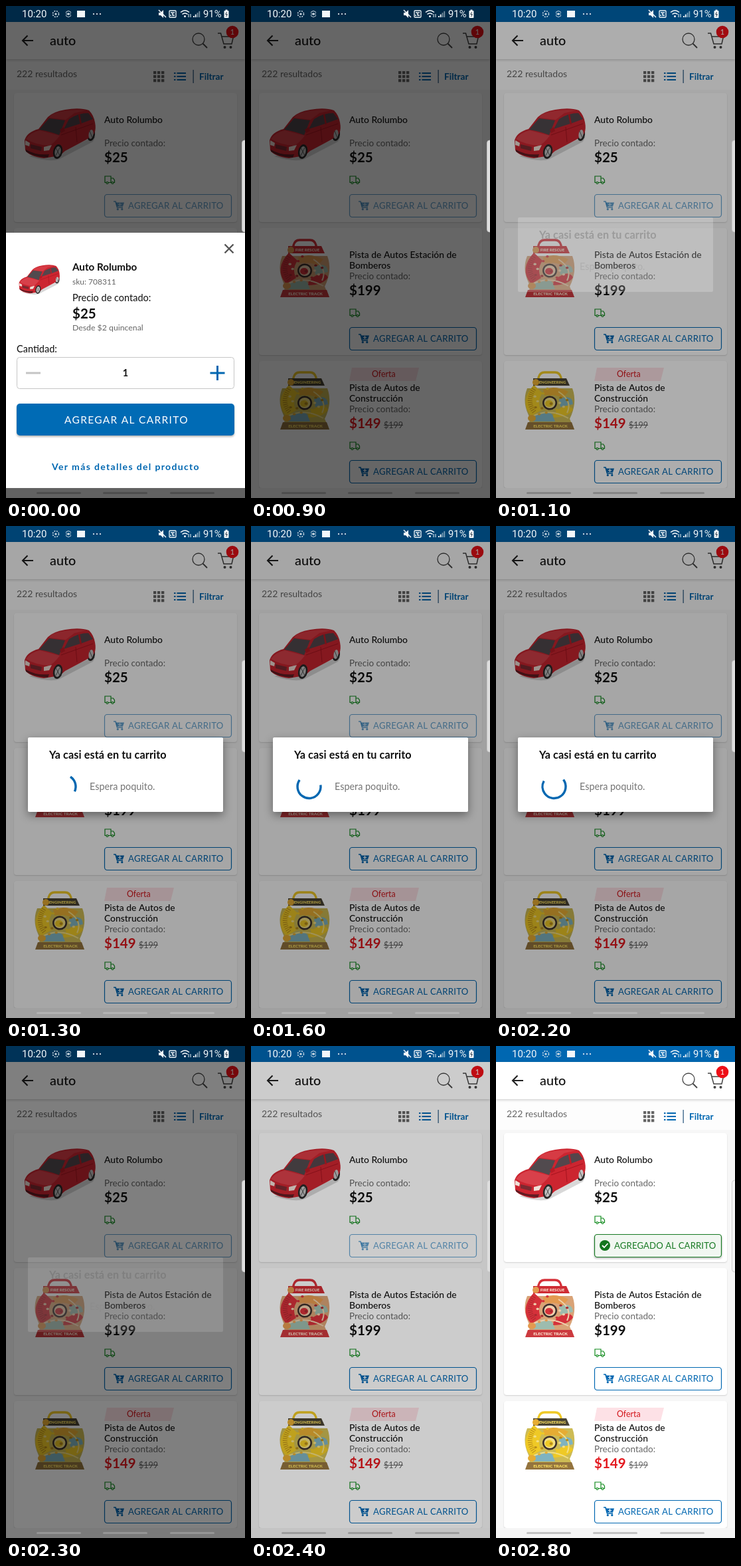
Write an HTML page with a canvas that moves like this. It is 360 px wide and 740 px high and loops after 2900 ms.

```html
<!DOCTYPE html>
<html lang="es">
<head>
<meta charset="utf-8">
<title>Agregar al carrito</title>
<style>
html, body { margin: 0; width: 100%; height: 100%; overflow: hidden; background: #f7f7f7; }
canvas { display: block; width: 360px; height: 740px; }
</style>
</head>
<body>
<canvas id="stage"></canvas>
<script>
const LOOP = 2900, STEP = 100;
const BLUE = '#0067b1', GREEN = '#0f8a1c', INK = '#101010', GRAY = '#666', RED = '#e3191f';
const canvas = document.getElementById('stage');
const ratio = window.devicePixelRatio || 1;
canvas.width = 360 * ratio;
canvas.height = 740 * ratio;
const c = canvas.getContext('2d');
c.scale(ratio, ratio);

function text(s, x, y, size, color, o = {}) {
  c.font = `${o.weight || 400} ${size}px ${o.font || 'Lato'}, sans-serif`;
  c.letterSpacing = (o.gap || 0) + 'px';
  c.textAlign = o.align || 'left';
  c.fillStyle = color;
  c.fillText(s, x, y);
}

function rect(x, y, w, h, fill, r = 0) {
  c.beginPath();
  c.roundRect(x, y, w, h, r);
  c.fillStyle = fill;
  c.fill();
}

function frame(x, y, w, h, color, r, width = 1) {
  c.beginPath();
  c.roundRect(x, y, w, h, r);
  c.strokeStyle = color;
  c.lineWidth = width;
  c.stroke();
}

function poly(points, fill) {
  c.beginPath();
  points.forEach(([x, y]) => c.lineTo(x, y));
  c.closePath();
  c.fillStyle = fill;
  c.fill();
}

function oval(x, y, rx, ry, fill, turn = 0) {
  c.beginPath();
  c.ellipse(x, y, rx, ry, turn, 0, 7);
  c.fillStyle = fill;
  c.fill();
}

function stroke(d, color, width = 1.5) {
  c.strokeStyle = color;
  c.lineWidth = width;
  c.stroke(new Path2D(d));
}

function fill(d, color) {
  c.fillStyle = color;
  c.fill(new Path2D(d));
}

function at(x, y, scale, draw) {
  c.save();
  c.translate(x, y);
  c.scale(scale, scale);
  draw();
  c.restore();
}

function faded(alpha, draw) {
  c.save();
  c.globalAlpha = alpha;
  draw();
  c.restore();
}

function shadowed(blur, dy, alpha, draw) {
  c.save();
  c.shadowColor = `rgba(0,0,0,${alpha})`;
  c.shadowBlur = blur * ratio;
  c.shadowOffsetY = dy * ratio;
  draw();
  c.restore();
}

// Toy car in a 108 x 80 box
function car() {
  fill('M8 74 Q40 84 54 78 L104 52 L108 44 L70 60Z', 'rgba(60,60,60,.2)');
  oval(101, 41, 6, 10, '#2b2929', .15);
  fill('M1 50 Q4 38 22 33 L36 15 Q44 7 62 4 Q84 0 98 5 Q105 12 107 23 Q109 33 106 40 L101 44 L94 49 L62 66 L54 73 L30 77 Q8 74 2 65Z', '#cc2530');
  fill('M3 48 Q10 38 24 35 L54 43 Q45 55 38 58 Q18 57 3 48Z', '#d8404a');
  fill('M42 11 Q66 2 94 5 L76 9 L63 19 L38 16Z', '#d63b44');
  fill('M23 34 L38 17 L62 20 L53 42 Q37 36 23 34Z', '#514a4e');
  fill('M60 33 L68 18 Q82 9 97 9 L104 18 L88 24Z', '#55454b');
  stroke('M83 11 L86 26', '#bd1c26', 2.5);
  stroke('M56 42 L104 25 M78 30 L80 53', '#a5141f', 1);
  fill('M54 34 L60 30 L62 36 L56 39Z', '#b81a25');
  oval(51, 67, 7, 11, '#2b2929', .2);
  oval(51, 67, 4.5, 8, '#c4c4c4', .2);
  oval(101, 41, 3.5, 7, '#c4c4c4', .15);
  stroke('M48 61 L54 73 M54 61 L48 73 M99 36 L103 46', '#555', 1);
  fill('M2 50 L9 54 L8 59 L2 57Z M30 60 L42 57 L38 65 L30 66Z', '#f0dfd7');
  fill('M10 56 L27 60 L26 66 L10 62Z', '#7c2a31');
  fill('M3 64 Q18 73 38 71 L36 76 Q15 75 3 67Z', '#611b22');
}

// Boxed track toy, drawn around its hub
function toy(p) {
  stroke('M-17 -35 V-38 Q-15 -46 -8 -46 H8 Q15 -46 17 -38 V-35', p.main, 3.4);
  fill('M-34 -22 Q-43 0 -29 24 L-36 40 H37 L30 24 Q42 0 34 -22Z', p.ground);
  fill('M-24 -27 Q-47 -2 -28 20 L-13 11 Q-20 -2 -11 -15Z', p.main);
  c.setLineDash([1, 2]);
  stroke('M-24 -21 Q-36 -2 -23 14', p.dark, 7);
  c.setLineDash([]);
  fill('M-10 -20 Q8 -27 28 -17 L20 -8 Q4 -14 -8 -11Z', p.warm);
  fill('M14 -6 Q34 -14 35 2 L16 6Z', p.sky);
  fill('M10 12 Q28 -2 35 10 Q28 22 4 22Z', p.main);
  fill('M-22 18 Q-4 8 4 18 L8 28 H-30Z', p.sky);
  stroke('M-26 20 Q0 7 28 23 M13 -17 Q35 -3 26 15', p.pale, 2);
  for (let i = 0; i < 16; i++) {
    const a = i * 2.4, r = 15 + i * .9;
    oval(r * Math.cos(a), r * Math.sin(a) * .75, 2.2, 1.7, [p.pale, p.dark, p.warm, p.main][i % 4]);
  }
  oval(0, 0, 11, 10.5, '#3b2f2c');
  oval(0, 0, 8.5, 8, p.pale);
  oval(-1, 1, 6, 5, p.main);
  oval(2, 1, 2.5, 2, p.dark);
  poly([[-25, -37], [25, -37], [30, -26], [-25, -26]], p.band);
  oval(-21, -31, 5, 5, p.warm);
  text(p.title, 4, -29.5, 6, p.label, { weight: 900, align: 'center' });
  oval(-27, 23, 6, 5, p.warm);
  poly([[-33, 29], [33, 29], [37, 40], [-37, 40]], p.base);
  text('ELECTRIC TRACK', 1, 37, 6.4, p.label, { weight: 900, align: 'center' });
}

const FIRE = { title: 'FIRE RESCUE', main: '#d5313a', dark: '#a92a30', warm: '#e39a50', sky: '#9dbcae',
  ground: '#d9a377', pale: '#efd0ae', band: '#cf2d35', base: '#cc3a3f', label: '#fbe0cc' };
const BUILD = { title: 'ENGINEERING', main: '#efc926', dark: '#b98d1c', warm: '#e6ac33', sky: '#7fb3c0',
  ground: '#cdbb55', pale: '#f3df85', band: '#4a4434', base: '#94743f', label: '#f8dd5e' };

function truck(y) {
  at(148, y, 1, () => {
    stroke('M3 10.5 H1 V1 H10 V10.5 H6 M10 4 H13.5 L15.5 7 V10.5 H14 M10 10.5 H11', GREEN, 1.2);
    for (const x of [4.5, 12.5]) {
      c.beginPath();
      c.arc(x, 11, 1.5, 0, 7);
      c.stroke();
    }
  });
}

function cartIcon(x, y) {
  at(x, y, 1, () => {
    stroke('M0 1 H3 L5.5 10 H14', BLUE, 1.7);
    fill('M3.5 2.5 H16 L14 8.5 H5Z', BLUE);
    stroke('M9.5 3 V8 M7 5.5 H12', '#fff', 1.2);
    oval(6.3, 12.7, 1.6, 1.6, BLUE);
    oval(12.8, 12.7, 1.6, 1.6, BLUE);
  });
}

function buyButton(y) {
  rect(148, y, 192, 35, '#fff', 4);
  frame(148.5, y + .5, 191, 34, BLUE, 4, 1.2);
  cartIcon(162, y + 10);
  text('AGREGAR AL CARRITO', 184, y + 22, 13.2, BLUE, { gap: .25 });
}

function addedButton(y) {
  shadowed(3, 1.5, .3, () => rect(148, y, 192, 35, '#f1f7f1', 4));
  frame(148.5, y + .5, 191, 34, '#187a24', 4, 1.2);
  oval(164, y + 17, 8, 8, '#14761f');
  stroke(`M160 ${y + 17} l3 3 l5.5 -6`, '#fff', 1.8);
  text('AGREGADO AL CARRITO', 178, y + 22, 13.2, '#187a24', { gap: .1 });
}

// base is the baseline of the price caption
function card(y, h, base, lines, price, priceColor = INK) {
  shadowed(2, 1, .16, () => rect(12, y, 336, h, '#fff', 4));
  const first = lines.length > 1 ? base - 32 : base - 35;
  lines.forEach((s, i) => text(s, 148, first + i * 16, 13.9, INK, { weight: 500 }));
  text('Precio contado:', 148, base, 13.5, GRAY);
  text(price, 148, base + 24, 20.5, priceColor, { weight: 700 });
  truck(base + 44);
}

function header() {
  rect(0, 80, 360, 46, '#fdfdfd');
  shadowed(4, 1, .22, () => rect(0, 24, 360, 56, '#fff'));
  stroke('M41 52 H25 M32.5 44.5 L25 52 L32.5 59.5', '#222', 2.1);
  text('auto', 66, 59, 19.8, INK, { weight: 500 });
  c.beginPath();
  c.arc(290, 50, 9, 0, 7);
  c.strokeStyle = '#444';
  c.lineWidth = 1.3;
  c.stroke();
  stroke('M296.5 56.5 L303 63', '#444', 1.8);
  stroke('M319 41 H323.5 L328 57 H340 L342.5 46 H325', '#444', 1.5);
  oval(329.5, 62, 2, 2, '#444');
  oval(338.5, 62, 2, 2, '#444');
  oval(341, 39, 9.3, 9.3, '#ee0f17');
  text('1', 341, 43, 11, '#fff', { align: 'center' });

  text('222 resultados', 16, 107, 14, GRAY);
  for (let i = 0; i < 9; i++) rect(222 + i % 3 * 6, 98 + Math.floor(i / 3) * 6, 4.3, 4.3, '#666');
  for (const y of [100, 105, 110]) {
    rect(253, y, 2.5, 2, BLUE);
    rect(257.5, y, 13.5, 2, BLUE);
  }
  rect(281.5, 96, 1.3, 20, '#315f85');
  text('Filtrar', 291, 111, 13.6, BLUE, { weight: 700 });
}

function page(t) {
  rect(0, 0, 360, 740, '#f7f7f7');
  rect(0, 0, 360, 24, '#0067b1');
  header();

  card(131, 194, 211, ['Auto Rolumbo'], '$25');
  at(27, 152, 1, car);
  if (t < 2700) faded(.6, () => buyButton(283));
  else faded(t < 2800 ? .6 : 1, () => addedButton(283));

  card(334, 191, 411, ['Pista de Autos Estación de', 'Bomberos'], '$199');
  at(81, 398, 1, () => toy(FIRE));
  buyButton(483);

  card(534, 191, 611, ['Pista de Autos de', 'Construcción'], '$149', RED);
  at(81, 597, 1, () => toy(BUILD));
  poly([[152, 544], [253, 544], [248, 564], [148, 564]], '#fde1e6');
  text('Oferta', 182, 558, 12.4, '#d3161c');
  text('$199', 200, 635, 12.5, GRAY);
  rect(200, 630, 29, 1, GRAY);
  buyButton(683);

  rect(0, 725, 360, 15, '#f5f5f5');
}

function pills(color) {
  for (const x of [46, 146, 247]) rect(x, 731, 67, 3, color, 1.5);
}

function statusBar() {
  const w = '#f4f7fa', soft = '#d5e0e9';
  const sys = { font: 'Roboto' };
  text('10:20', 24, 17, 15, w, sys);
  c.setLineDash([2, 1.6]);
  stroke('M79.5 12 A4.5 4.5 0 1 1 70.5 12 A4.5 4.5 0 1 1 79.5 12', soft, 1.4);
  c.setLineDash([]);
  oval(75, 12, 1.6, 1.6, soft);
  stroke('M90 10 Q94 5 98 10 M90 14 Q94 19 98 14 M90 12 H98', soft, 1.1);
  oval(94, 12, 1.7, 1.7, soft);
  rect(107, 7, 12, 10, w);
  for (const x of [132, 137, 142]) oval(x, 12, 1.1, 1.1, w);

  fill('M230 10 H233 L237 6 V18 L233 14 H230Z', w);
  stroke('M230 6 L241 17', w, 1.5);
  frame(246, 7, 10, 10, w, 1, 1.3);
  stroke('M248 10 H251 V14 H254 M253 9 V11 M248 13 V15', w, 1.5);
  stroke('M263 9.5 Q269.5 4 276 9.5 M265.5 12.5 Q269.5 9 273.5 12.5', w, 1.6);
  oval(269.5, 15.5, 1.5, 1.5, w);
  stroke('M275 12 V17 M278 12 V17', w, 1);
  for (let i = 0; i < 4; i++) rect(282 + i * 2.8, 15 - i * 2.4, 1.8, 2 + i * 2.4, i < 2 ? w : 'rgba(244,247,250,.5)');
  text('91%', 297, 17, 14.8, w, sys);
  rect(328.5, 7, 7, 11, w, 1);
  rect(330.5, 5.5, 3, 2, w);
  stroke('M332.5 9 L330.8 12.5 H333.3 L331.5 16', '#234', 1);
}

function edgeHandle(t) {
  rect(355.5, 202, 9, 138, t < 2500 ? '#dedede' : '#f5f5f5', 4);
  frame(355.5, 202, 9, 138, '#c4c4c4', 4, .8);
}

function sheet() {
  rect(0, 341, 360, 384, '#fff');
  stroke('M329.5 358.5 L342.5 371.5 M342.5 358.5 L329.5 371.5', '#555', 2.4);
  at(19, 388, .575, car);
  text('Auto Rolumbo', 100, 398, 15.2, INK, { weight: 700 });
  text('sku: 708311', 100, 419, 12, GRAY);
  text('Precio de contado:', 100, 444, 14.5, INK);
  text('$25', 100, 470, 20.5, INK, { weight: 700 });
  text('Desde $2 quincenal', 100, 488, 12.3, GRAY);
  text('Cantidad:', 16, 521, 14.5, INK);
  frame(16.5, 528.5, 327, 47, '#c6c6c6', 4);
  rect(30, 550.5, 22, 3, '#c4c4c4');
  text('1', 180, 557, 14.5, INK, { weight: 700, align: 'center' });
  rect(307.5, 550.5, 22, 3, BLUE);
  rect(317, 541, 3, 22, BLUE);
  shadowed(3, 2, .3, () => rect(16, 598, 328, 48, '#006bb5', 5));
  text('AGREGAR AL CARRITO', 88, 628, 15.5, '#fff', { gap: 1.3 });
  text('Ver más detalles del producto', 69, 698, 14, BLUE, { weight: 700, gap: 1.35 });
}

const mix = (a, b, k) => a + (b - a) * k;

// Tail and head angles in degrees: the arc grows, then keeps turning
function spinnerArc(t) {
  if (t < 1600) {
    const k = Math.max(0, (t - 1100) / 500);
    const grow = k * k * (3 - 2 * k);
    const tail = mix(-90, -8, k);
    return [tail, tail + mix(5, 223, grow)];
  }
  const k = (t - 1600) / 500;
  return [mix(-8, 268, k), mix(215, 510, k)];
}

function dialogAlpha(t) {
  if (t < 1200) return .2;
  if (t < 1300) return .8;
  return t < 2300 ? 1 : .13;
}

function dialog(t) {
  const alpha = dialogAlpha(t);
  faded(alpha, () => {
    if (alpha < 1) rect(33, 318, 294, 112, '#fff', 2);
    else shadowed(14, 5, .4, () => rect(33, 318, 294, 112, '#fff', 2));
    text('Ya casi está en tu carrito', 65, 350, 16.2, INK, { weight: 700, gap: .1 });
    text('Espera poquito.', 126, 397, 14.4, '#757575');
    if (alpha > .5) {
      const [tail, head] = spinnerArc(t).map(a => a * Math.PI / 180);
      c.beginPath();
      c.arc(87.5, 392, 17.5, tail, head);
      c.strokeStyle = BLUE;
      c.lineWidth = 3.4;
      c.stroke();
    }
  });
}

function dim(t) {
  if (t < 1100) return .6;
  if (t < 1200) return .32;
  if (t < 2300) return .35;
  if (t < 2400) return .5;
  return t < 2500 ? .2 : 0;
}

function draw(now) {
  const t = Math.floor(now % LOOP / STEP) * STEP;
  const overlayPills = t >= 1200 && t < 2400;
  page(t);
  if (!overlayPills) pills('#c3c3c3');
  rect(0, 0, 360, 740, `rgba(0,0,0,${dim(t)})`);
  if (overlayPills) pills('rgba(255,255,255,.2)');
  statusBar();
  edgeHandle(t);
  if (t < 900) sheet();
  if (t >= 1100 && t < 2400) dialog(t);
}

const start = performance.now();
function tick() {
  draw(performance.now() - start);
  requestAnimationFrame(tick);
}
tick();
</script>
</body>
</html>
```
